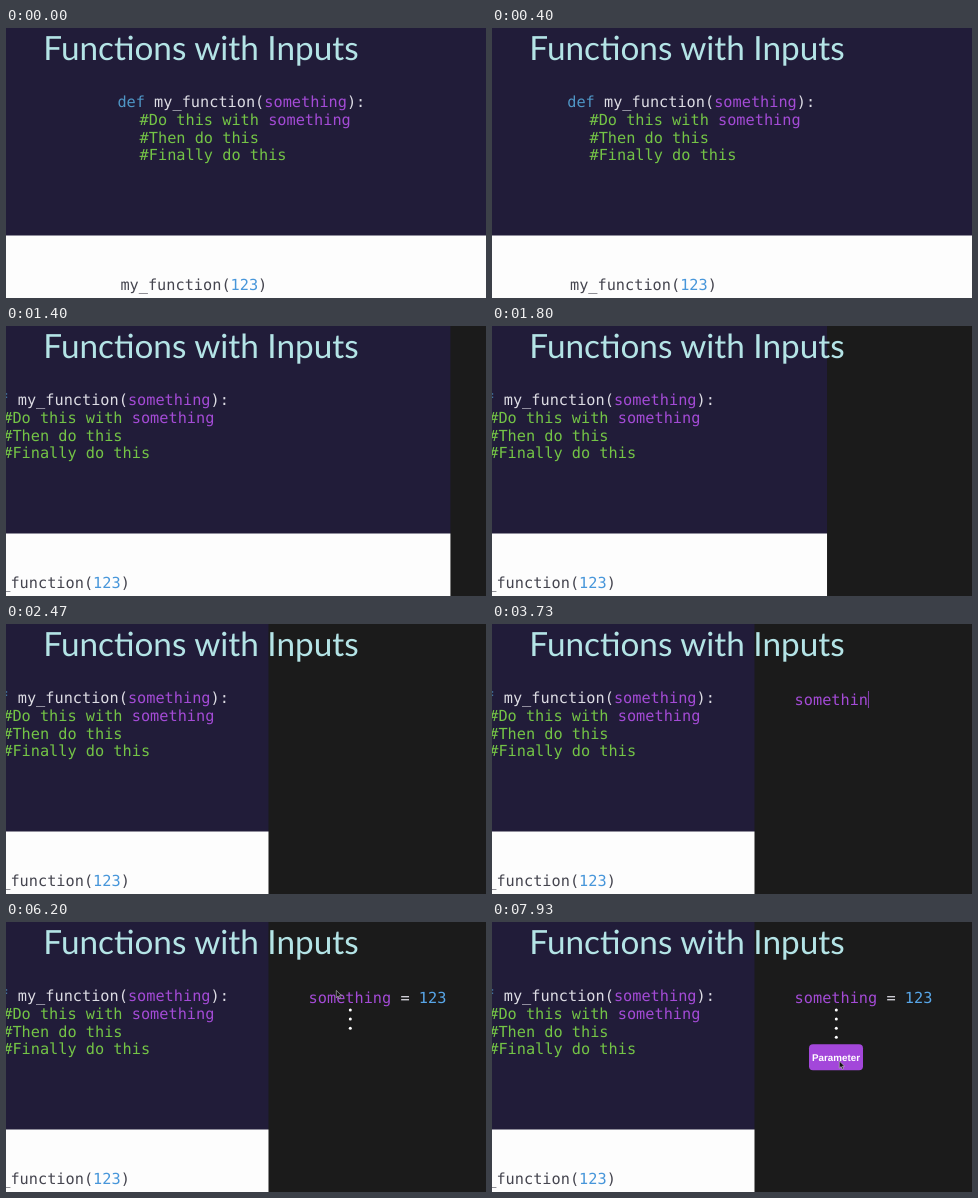
Recreate the animation shown at these times as an HTML page. Size 480 px wide and 270 px high, loop 8000 ms.

```html
<!DOCTYPE html>
<html lang="en">
<head>
<meta charset="utf-8">
<title>Functions with Inputs</title>
<style>
  html, body { margin: 0; width: 100%; height: 100%; overflow: hidden; background: #211c39; }
  svg { display: block; width: 100vw; height: 100vh; }
  text { white-space: pre; text-rendering: geometricPrecision; font-variant-ligatures: none; }
  .code { font: 15.25px "DejaVu Sans Mono", monospace; }
  .title { font: 33.3px Lato, sans-serif; fill: #b4e4e6; }
  .label { font: bold 9.8px "Liberation Sans", Arial, sans-serif; fill: #fff; }
  .key { fill: #4f96c6; }
  .name { fill: #dddce4; }
  .arg { fill: #a44bd6; }
  .note { fill: #74c446; }
  .ink { fill: #45454f; }
  .num { fill: #4796da; }
</style>
</head>
<body>
<svg viewBox="0 0 480 270">
  <rect width="480" height="270" fill="#211c39"/>
  <rect y="207.5" width="480" height="62.5" fill="#fdfdfd"/>
  <g id="code" class="code">
    <text x="111.4" y="79"><tspan class="key">def</tspan><tspan class="name"> my_function(</tspan><tspan class="arg">something</tspan><tspan class="name">):</tspan></text>
    <text x="133.6" y="97"><tspan class="note">#Do this with </tspan><tspan class="arg">something</tspan></text>
    <text x="133.6" y="114.5" class="note">#Then do this</text>
    <text x="133.6" y="132" class="note">#Finally do this</text>
  </g>
  <text id="call" class="code" x="114.4" y="261.5"><tspan class="ink">my_function(</tspan><tspan class="num">123</tspan><tspan class="ink">)</tspan></text>
  <rect id="panel" width="240" height="270" fill="#1b1b1b"/>
  <text class="title" x="37.3" y="32">Functions with Inputs</text>
  <text class="code" x="302.6" y="80.5"><tspan id="word" class="arg"></tspan><tspan id="equals" class="name"></tspan><tspan id="value" fill="#58a6e8"></tspan></text>
  <rect id="caret" y="67" width="1" height="17" fill="#8a41b4"/>
  <g id="dots" fill="#fff"></g>
  <g id="button">
    <rect x="317" y="122.3" width="54" height="26" rx="4" fill="#a347da"/>
    <text class="label" x="344" y="138.5" text-anchor="middle">Parameter</text>
  </g>
  <path id="mouse" d="M0 0V7.2L1.8 5.6L3 8.2L4.2 7.6L3.1 5.2H5.3Z" fill="#111" stroke="#c9c9c9" stroke-width=".6"/>
</svg>
<script>
  const LOOP = 8000, CHAR = 15.25 * 0.602;
  const $ = id => document.getElementById(id);
  const clamp = v => Math.max(0, Math.min(1, v));
  const ease = (t, from, to) => (1 - Math.cos(Math.PI * clamp((t - from) / (to - from)))) / 2;
  const lerp = (a, b, p) => a + (b - a) * p;
  const show = (el, on) => el.setAttribute("visibility", on ? "visible" : "hidden");
  const move = (el, x, y) => el.setAttribute("transform", `translate(${x} ${y})`);

  const typed = "something = 123";
  const keys = [3050, 3150, 3260, 3380, 3530, 3590, 3650, 3710, 3790, 3920, 4120, 4430, 4660, 4820, 5000];
  // time, x, y of the pointer's stops
  const stops = [[5200, 332, 91], [5530, 332, 91], [5760, 272, 26], [6130, 330.3, 68.5], [7270, 330.3, 68.5], [7800, 347.3, 139]];

  const dots = [0, 1, 2, 3].map(i => {
    const dot = document.createElementNS("http://www.w3.org/2000/svg", "circle");
    dot.setAttribute("cx", 344.3);
    dot.setAttribute("cy", 88 + 9.1 * i);
    dot.setAttribute("r", 1.5);
    return $("dots").appendChild(dot);
  });

  function pointer(t) {
    let [, x, y] = stops[0];
    for (let i = 1; i < stops.length; i++) {
      const p = ease(t, stops[i - 1][0], stops[i][0]);
      x = lerp(x, stops[i][1], p);
      y = lerp(y, stops[i][2], p);
    }
    return [x, y];
  }

  function draw(t) {
    const slide = ease(t, 0, 1165);
    move($("code"), -136.4 * slide, 0);
    move($("call"), -137.5 * slide, 0);
    $("panel").setAttribute("x", lerp(480, 262.5, ease(t, 1092, 2258)));

    const count = keys.filter(k => k <= t).length;
    const text = typed.slice(0, count);
    $("word").textContent = text.slice(0, 9);
    $("equals").textContent = text.slice(9, 12);
    $("value").textContent = text.slice(12);
    $("caret").setAttribute("x", 302.5 + count * CHAR);
    show($("caret"), t >= 2670 && t < 5200);

    dots.forEach((dot, i) => show(dot, t >= 5880 + 140 * i));
    $("button").setAttribute("opacity", ease(t, 6450, 6800));

    show($("mouse"), t >= stops[0][0]);
    move($("mouse"), ...pointer(t));
  }

  function tick(now) {
    draw(now % LOOP);
    requestAnimationFrame(tick);
  }
  draw(0);
  requestAnimationFrame(tick);
</script>
</body>
</html>
```
